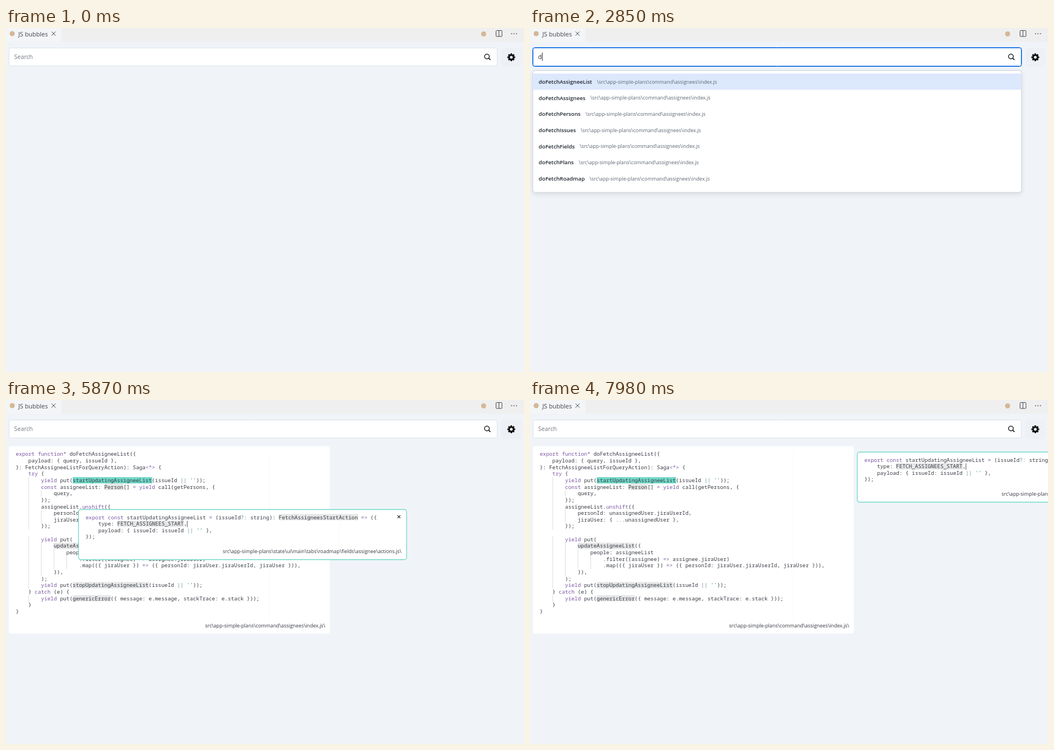
These frames come from a looping animation (917x611 px, 8 s). An HTML page with a canvas:

```html
<!DOCTYPE html>
<html lang="en">
<head>
<meta charset="utf-8">
<title>Code bubbles</title>
<style>
  html, body { margin: 0; width: 100%; height: 100%; overflow: hidden; background: #f0f4f8; }
  canvas { display: block; }
</style>
</head>
<body>
<canvas id="stage" width="917" height="611"></canvas>
<script>
const ctx = document.getElementById('stage').getContext('2d');
const LOOP = 8000;
const SANS = '"Open Sans", "Noto Sans", sans-serif';
const MONO = '"Noto Sans Mono", "DejaVu Sans Mono", monospace';
const CHAR = 5.604, LINE = 11.65;
const BG = '#f0f4f8', INK = '#383b43', PURPLE = '#7a55a3', TEAL = '#72d8c8', BLUE = '#2b7de9';

const ACTIONS = 'src\\app-simple-plans\\state\\ui\\main\\tabs\\roadmap\\fields\\assignee\\actions.js';
const COMMAND = 'src\\app-simple-plans\\command\\assignees\\index.js';

const mainCode = `export function* doFetchAssigneeList({
    payload: { query, issueId },
}: FetchAssigneeListForQueryAction): Saga<*> {
    try {
        yield put(startUpdatingAssigneeList(issueId || ''));
        const assigneeList: Person[] = yield call(getPersons, {
            query,
        });
        assigneeList.unshift({
            personId: unassignedUser.jiraUserId,
            jiraUser: { ...unassignedUser },
        });

        yield put(
            updateAssigneeList({
                people: assigneeList
                    .filter((assignee) => assignee.jiraUser)
                    .map(({ jiraUser }) => ({ personId: jiraUser.jiraUserId, jiraUser })),
            }),
        );
        yield put(stopUpdatingAssigneeList(issueId || ''));
    } catch (e) {
        yield put(genericError({ message: e.message, stackTrace: e.stack }));
    }
}`.split('\n');

const actionCode = `export const startUpdatingAssigneeList = (issueId?: string): FetchAssigneesStartAction => ({
    type: FETCH_ASSIGNEES_START,
    payload: { issueId: issueId || '' },
});`.split('\n');

const mainLinks = ['startUpdatingAssigneeList', 'Person', 'updateAssigneeList', 'stopUpdatingAssigneeList', 'genericError'];
const actionLinks = ['FetchAssigneesStartAction', 'FETCH_ASSIGNEES_START'];

// name and left edge of its path
const symbols = [
  ['FETCH_ASSIGNEES_START', 142.3], ['FETCH_ASSIGNEES_STOP', 137.8],
  ['FetchAssignlistProgressPayload', 168.3], ['FetchAssigneesStartAction', 146.3],
  ['FetchAssigneesStopAction', 145.3], ['startUpdatingAssigneeList', 145.3],
  ['stopUpdatingAssigneeList', 144.3]
];
const found = ['doFetchAssigneeList', 'doFetchAssignees', 'doFetchPersons', 'doFetchIssues',
  'doFetchFields', 'doFetchPlans', 'doFetchRoadmap'];

// drag path: time, left, top
const path = [
  [6260, 128, 194.5], [6560, 290, 147.8], [6880, 430, 75.5], [7030, 476, 87.5],
  [7200, 506.8, 92.5], [7520, 566, 97.5], [7660, 574, 92.5], [7980, 579, 92.5]
];
const ticks = [6320, 6400, 6480, 6560, 6660, 6740, 6820, 6880, 6950, 7030,
  7130, 7200, 7260, 7350, 7430, 7520, 7660, 7980];

function dragPos(t) {
  const at = ticks.filter(k => k <= t).pop() || path[0][0];
  const i = Math.max(1, path.findIndex(p => p[0] >= at));
  const [t0, x0, y0] = path[i - 1], [t1, x1, y1] = path[i];
  const k = Math.max(0, (at - t0) / (t1 - t0));
  return [x0 + (x1 - x0) * k, y0 + (y1 - y0) * k];
}

function rect(x, y, w, h, color) {
  ctx.fillStyle = color;
  ctx.fillRect(x, y, w, h);
}

function box(x, y, w, h, r, fill, stroke, width = 1) {
  ctx.beginPath();
  ctx.roundRect(x, y, w, h, r);
  if (fill) { ctx.fillStyle = fill; ctx.fill(); }
  if (stroke) { ctx.strokeStyle = stroke; ctx.lineWidth = width; ctx.stroke(); }
}

function lines(color, width, ...segs) {
  ctx.strokeStyle = color;
  ctx.lineWidth = width;
  ctx.beginPath();
  for (const [x0, y0, x1, y1] of segs) {
    ctx.moveTo(x0, y0);
    ctx.lineTo(x1, y1);
  }
  ctx.stroke();
}

function text(str, x, y, size, color, { weight = 400, align = 'left', space = 0 } = {}) {
  ctx.font = `${weight} ${size}px ${SANS}`;
  ctx.letterSpacing = space + 'px';
  ctx.textAlign = align;
  ctx.fillStyle = color;
  ctx.fillText(str, x, y);
  const w = ctx.measureText(str).width;
  ctx.letterSpacing = '0px';
  return w;
}

function cross(x, y, r, color, width) {
  lines(color, width, [x - r, y - r, x + r, y + r], [x - r, y + r, x + r, y - r]);
}

function dot(x, y, r, color) {
  ctx.fillStyle = color;
  ctx.beginPath();
  ctx.arc(x, y, r, 0, 7);
  ctx.fill();
}

function tokenColor(tok) {
  if (/^(export|function\*|yield|try|catch|const|unshift|=>|=|<\*>)$/.test(tok)) return PURPLE;
  if (tok === "''") return '#2d9165';
  if (/^(\|\||\?:|\.\.\.)$/.test(tok)) return '#68909b';
  return INK;
}

function code(src, x, y, links, active) {
  ctx.textAlign = 'left';
  src.forEach((line, i) => {
    const base = y + i * LINE;
    const indent = line.search(/\S/);
    for (let c = 4; c < indent; c += 4) rect(x + c * CHAR, base - 8.9, 1, LINE, '#d9dbdd');
    for (const m of line.matchAll(/function\*|\w+|<\*>|=>|\|\||''|\?:|\.\.\.|[^\s\w]/g)) {
      const tx = x + m.index * CHAR;
      if (links.includes(m[0])) {
        const on = active && m[0] === links[0];
        rect(tx, base - 8.9, m[0].length * CHAR + 0.6, 11.2, on ? active : '#e5e6e6');
      }
      ctx.font = `400 9.34px ${MONO}`;
      ctx.fillStyle = tokenColor(m[0]);
      ctx.fillText(m[0], tx, base);
    }
  });
}

function gear(x, y) {
  for (let i = 0; i < 8; i++) {
    const a = i * Math.PI / 4, c = Math.cos(a), s = Math.sin(a);
    lines('#0b0b0b', 3, [x + c * 3, y + s * 3, x + c * 6.9, y + s * 6.9]);
  }
  dot(x, y, 5.3, '#0b0b0b');
  dot(x, y, 2.5, '#edf1f5');
}

function chrome() {
  rect(0, 0, 917, 611, BG);
  rect(0, 0, 917, 24.5, '#efefef');
  rect(0, 0, 98, 24.5, '#f3f5f7');
  dot(11, 10, 4.5, '#d5b796');
  text('JS bubbles', 21.7, 15, 10.9, '#42464d');
  cross(84.2, 10, 3.6, '#44474c', 1);
  dot(845.5, 10.5, 4.5, '#d5b796');
  box(867.5, 4.5, 10.5, 10.5, 1, null, '#44474c');
  lines('#44474c', 1, [872.7, 4.5, 872.7, 15]);
  for (const x of [895, 899.3, 903.6]) dot(x, 10.2, 0.85, '#44474c');
  box(877, 35, 35, 34, 3, '#edf1f5');
  gear(894.5, 52);
}

function search(t, query) {
  const ring = t >= 1530 && t < 5340;
  let border = '#d9e2ec';
  if (t >= 1530 && t < 4460) border = BLUE;
  else if (t >= 1050 && t < 1530) border = '#bcccdc';
  box(5.5, 35.5, 864, 32, 3, '#fff', border);
  if (ring) box(4.5, 34.5, 866, 34, 4, null, BLUE);

  const w = text(query || 'Search', 14.6, 55.2, 10.4, query ? '#252a31' : '#737881');
  if (t >= 1530 && t < 1980) rect(14.5, 43.5, 1, 15, '#222');
  if (query) rect(15 + w, 43.5, 1, 15, '#222');
  ctx.strokeStyle = '#111';
  ctx.lineWidth = 1.4;
  ctx.beginPath();
  ctx.arc(851.4, 50.6, 4.2, 0, 7);
  ctx.stroke();
  lines('#111', 1.5, [854.4, 53.6, 857.6, 56.6]);
}

function dropdown(query) {
  const rows = query ? found : symbols;
  const first = query ? 81 : 100;
  const height = first + 135.5;
  ctx.save();
  ctx.shadowColor = 'rgba(20,30,45,.11)';
  ctx.shadowBlur = 10;
  ctx.shadowOffsetY = 3;
  box(5, 75.5, 865, height, 4, '#fff');
  ctx.restore();
  box(5, 75.5, 865, height, 4, null, '#ccd2d9');
  if (!query) text('SYMBOLS FROM THE ACTIVE FILE', 15.3, 94.8, 7.6, '#8b94a0', { weight: 600, space: 0.25 });
  rect(5.5, first, 864, 28.6, '#dce8fc');
  rows.forEach((row, i) => {
    const y = first + 18 + i * 28.67;
    const name = query ? row : row[0];
    const w = text(name, 15.3, y, 9.65, '#1f2630', { weight: 600 });
    text('\\' + (query ? COMMAND : ACTIONS), query ? 24 + w : row[1], y - 0.5, 8.87, '#5d6673');
  });
}

function mainBubble(t) {
  box(5, 82, 568, 333, 4, '#fff');
  rect(466, 92, 1, 300, '#f8f8f8');
  let active = null;
  if (t >= 5560) active = TEAL;
  else if (t >= 4860) active = '#b9b9b9';
  else if (t >= 4630) active = '#c6c6c6';
  else if (t >= 4540) active = '#d6d6d6';
  code(mainCode, 17.2, 99.3, mainLinks, active);
  if (t < 5400) rect(17.5, 381.5, 1, 11, '#dcdddf');
  text(COMMAND + '\\', 565, 403.6, 8.87, '#34383f', { align: 'right' });
  if (t < 5870) cross(560.4, 94.8, 2.5, '#222', 1.2);
}

function actionBubble(t) {
  const [x, y] = dragPos(t);
  ctx.save();
  ctx.globalAlpha = t < 5400 ? 0.5 : 1;
  ctx.translate(x, y);
  box(0.4, 0, 580.8, 89, 4, '#fff', TEAL, 1.3);
  rect(461.5, 10, 1, 52, '#f8f8f8');
  code(actionCode, 13, 17, actionLinks);
  rect(192.3, 20, 1, 11.4, '#555');
  text(ACTIONS + '\\', 572, 77.4, 8.87, '#34383f', { align: 'right' });
  if (t >= 5870) cross(567.6, 12.9, 2.5, '#222', 1.2);
  ctx.restore();
}

function draw(t) {
  const query = t >= 2850 && t < 3610 ? (t < 3010 ? 'd' : t < 3150 ? 'do' : 'doF') : '';
  chrome();
  search(t, query);
  if (t >= 3770) mainBubble(t);
  if (t >= 5340) actionBubble(t);
  if (t >= 1530 && t < 3610) {
    ctx.globalAlpha = t < 1620 ? 0.5 : 1;
    dropdown(query);
    ctx.globalAlpha = 1;
  }
}

const start = performance.now();
function tick() {
  draw((performance.now() - start) % LOOP);
  requestAnimationFrame(tick);
}
tick();
</script>
</body>
</html>
```
